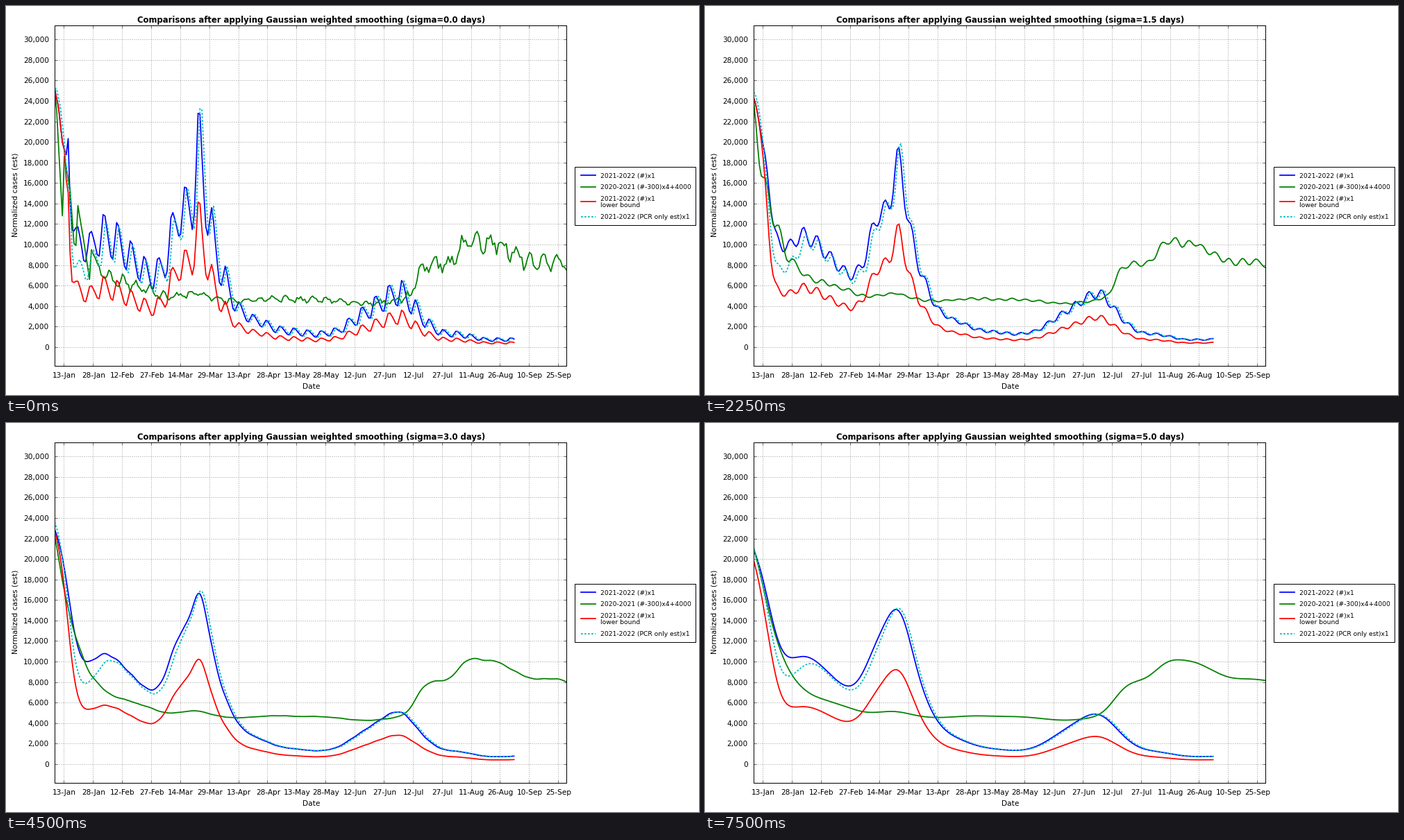
Write a matplotlib script that moves like this. It is 998 px wide and 561 px high and loops after 8 s.

```python
import numpy as np
import matplotlib.pyplot as plt
from matplotlib.animation import FuncAnimation
from matplotlib.patches import Rectangle

W, H, DPI = 998, 561, 64
LEFT, RIGHT, TOP, BOTTOM = 70, 807, 28, 519
ZERO_Y, PX_PER_UNIT = 491.8, 0.014783
LAST_DAY = 264          # days shown on the x axis, from 8 January
SEASON_END = 237        # last day of the 2021-2022 curves
LEAD = 12               # days of 2020-2021 data before the axis starts
STEP_MS, HOLD, FRAMES = 250, 3, 32

BLUE, GREEN, RED, CYAN = (0, 0, 1), (0, 0.5, 0), (1, 0, 0), (0, 0.75, 0.75)

plt.rcParams["font.family"] = "DejaVu Sans"
plt.rcParams["lines.scale_dashes"] = False


def pt(px):
    return px * 72 / DPI


# ---- data: a trend through key points, times a weekly reporting cycle ----

def trend(days, *points):
    return np.interp(days, *zip(*points))


def week(days, peak):
    """Seven-day wave with a quick rise and a slower fall."""
    a = 2 * np.pi * (days - peak) / 7 - 0.35
    return np.cos(a + 0.35 * np.cos(a))


def bump(days, centre, width, height):
    return height * np.exp(-((days - centre) / width) ** 2)


def smooth(y, sigma):
    if sigma == 0:
        return y
    i = np.arange(y.size)
    w = np.exp(-((i[:, None] - i) / sigma) ** 2 / 2)
    return w @ y / w.sum(axis=1)


season = np.arange(SEASON_END + 1)
year = np.arange(-LEAD, LAST_DAY + 1)

blue = trend(season, (0, 252), (2, 234), (4, 200), (6, 185), (9, 114),
             (12, 112), (15, 93), (25, 110), (32, 103), (39, 88), (50, 68),
             (57, 80), (60, 108), (65, 133), (71, 135), (74.5, 206), (78, 138),
             (81, 117), (85, 74), (88, 68), (92, 44), (99, 30), (116, 16.5),
             (136, 12.3), (146, 15.5), (155, 27), (175, 52), (179, 53),
             (185, 40), (191, 25), (199, 14), (210, 12), (222, 7.2),
             (237, 7.2))
cycle = trend(season, (9, 0), (16, 0.13), (26, 0.2), (105, 0.17), (116, 0.25))
blue = blue * (1 + cycle * week(season, 4.4)) + bump(season, 7, 0.6, 42)

red = blue * trend(season, (5, 1), (7, 0.74), (9, 0.56), (16, 0.53), (50, 0.54),
                   (60, 0.59), (74, 0.62), (95, 0.54), (155, 0.55), (237, 0.56))

# PCR-only estimate: a day late, and low in January
cyan = np.append(blue[0], blue[:-1]) * trend(
    season, (5, 1), (9, 0.66), (18, 0.81), (29, 0.97), (60, 0.94), (75, 1.02),
    (90, 1))

green = trend(year, (-12, 225), (-4, 225), (-1, 268), (0, 250), (1, 232),
              (4, 128), (5, 186), (8, 153), (10, 101), (11, 99), (12, 138),
              (15, 104), (18, 66), (19, 95), (24, 72), (31, 66), (50, 54),
              (57, 49), (75, 53), (85, 46), (97, 45), (112, 47), (143, 45.3),
              (160, 41.7), (172, 44), (184, 50), (188, 73), (194, 79),
              (204, 82), (210, 96), (216, 102), (230, 101), (237, 90),
              (243, 85), (264, 80))
ripple = trend(year, (20, 0), (26, 5), (60, 3), (95, 2.2), (175, 2.2),
               (190, 5), (210, 8), (232, 8), (245, 6), (264, 5))
noise = np.random.default_rng(4).uniform(-0.8, 0.8, year.size)
green = green + ripple * (week(year, 0) + noise)


# ---- stage ----

fig = plt.figure(figsize=(W / DPI, H / DPI), dpi=DPI, facecolor="white")
ax = fig.add_axes([LEFT / W, 1 - BOTTOM / H, (RIGHT - LEFT) / W,
                   (BOTTOM - TOP) / H])
ax.set_xlim(0, LAST_DAY)
ax.set_ylim((ZERO_Y - BOTTOM) / PX_PER_UNIT, (ZERO_Y - TOP) / PX_PER_UNIT)
x_ticks = 4.75 + 15 * np.arange(18)
y_ticks = np.arange(0, 30001, 2000)
ax.set_xticks(x_ticks)
ax.set_yticks(y_ticks)
ax.tick_params(direction="in", length=pt(4), width=pt(0.5), top=True,
               right=True, labelbottom=False, labelleft=False)
ax.grid(color="0.5", linewidth=pt(0.8), linestyle=(0, (pt(1), pt(2))))
ax.set_axisbelow(True)
for side in ax.spines.values():
    side.set_linewidth(pt(1))

over = fig.add_axes([0, 0, 1, 1])
over.set_xlim(0, W)
over.set_ylim(H, 0)
over.axis("off")


def label(x, y, text, px=10.5, ha="center", **kw):
    return over.text(x, y, text, fontsize=pt(px), ha=ha,
                     va=kw.pop("va", "baseline"), **kw)


DATES = ("13-Jan 28-Jan 12-Feb 27-Feb 14-Mar 29-Mar 13-Apr 28-Apr 13-May "
         "28-May 12-Jun 27-Jun 12-Jul 27-Jul 11-Aug 26-Aug 10-Sep 25-Sep")
for day, name in zip(x_ticks, DATES.split()):
    label(LEFT + day * (RIGHT - LEFT) / LAST_DAY + 1, 535.5, name)
for v in y_ticks:
    label(62, ZERO_Y - v * PX_PER_UNIT + 4, f"{v:,}", ha="right")
label(440, 552.5, "Date")
label(14, 272, "Normalized cases (est)", rotation=90, va="center")
title = label(440, 23.8, "", px=11.63, weight="bold")

SOLID = dict(linewidth=pt(1.75), solid_joinstyle="round")
DASHED = dict(linewidth=pt(1.75), linestyle=(0, (pt(2.8), pt(2.2))))

over.add_patch(Rectangle((819, 232), 174, 84, facecolor="white",
                         edgecolor="black", linewidth=pt(1)))
LEGEND = [
    (243.5, BLUE, SOLID, [(247.5, "2021-2022 (#)x1")]),
    (260.5, GREEN, SOLID, [(264, "2020-2021 (#-300)x4+4000")]),
    (281.5, RED, SOLID, [(280.5, "2021-2022 (#)x1"), (290.3, "lower bound")]),
    (303.5, CYAN, DASHED, [(307.3, "2021-2022 (PCR only est)x1")]),
]
for y, color, style, rows in LEGEND:
    over.plot([828, 849], [y, y], color=color, **style)
    for base, text in rows:
        label(856, base, text, px=9.1, ha="left")

curves = []
for data, days, color, style in [
    (blue, season, BLUE, SOLID),
    (green, year, GREEN, SOLID),
    (red, season, RED, SOLID),
    (cyan, season, CYAN, DASHED),
]:
    line, = ax.plot(days, data * 100, color=color, **style)
    curves.append((line, data * 100))


def draw(i):
    sigma = 0.5 * (i // HOLD)
    title.set_text("Comparisons after applying Gaussian weighted smoothing "
                   f"(sigma={sigma:.1f} days)")
    for line, data in curves:
        line.set_ydata(smooth(data, sigma))
    return [title] + [line for line, _ in curves]


anim = FuncAnimation(fig, draw, frames=FRAMES, interval=STEP_MS, repeat=True,
                     repeat_delay=0)
plt.show()
```
